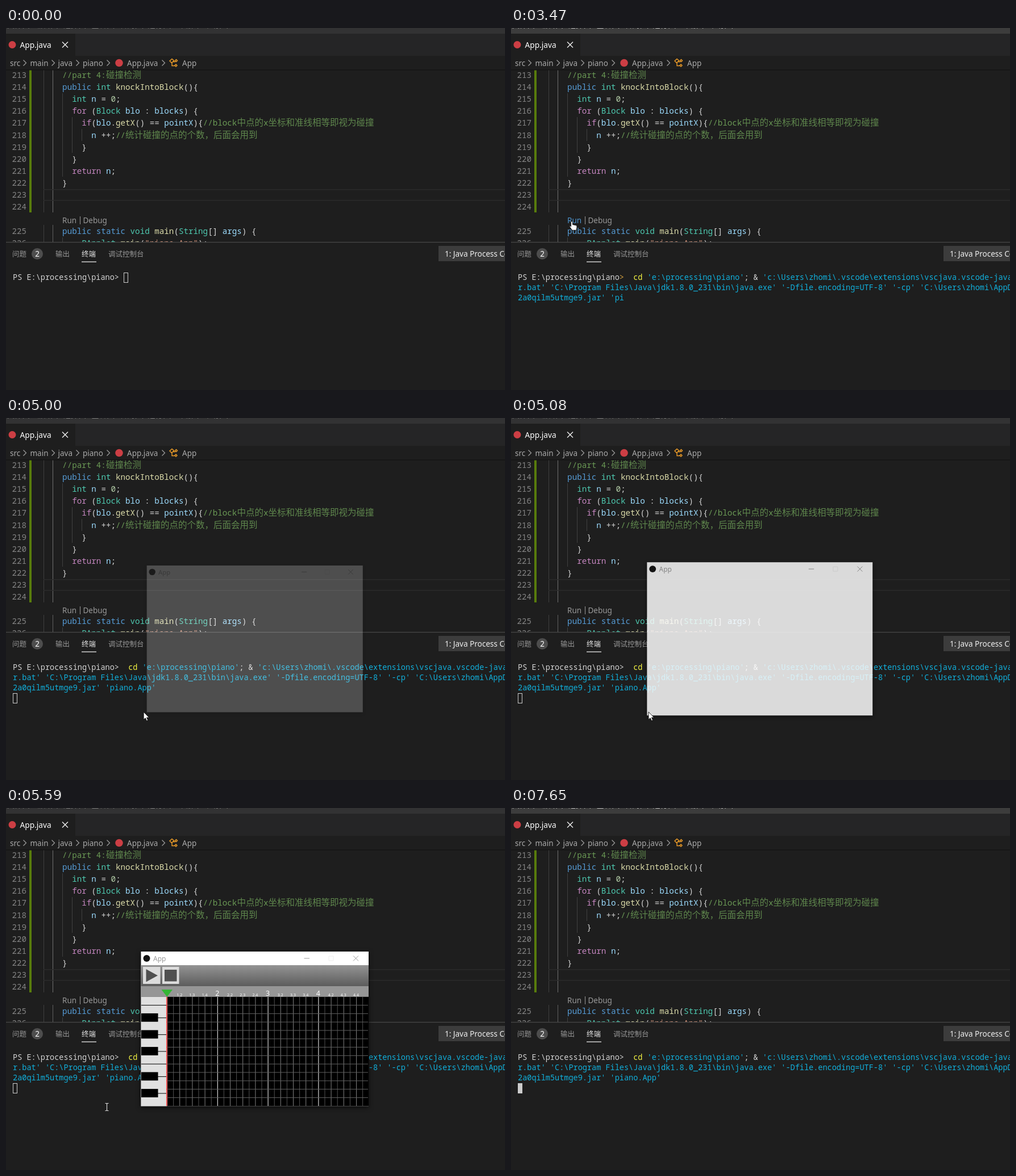
These frames come from a looping animation (878x638 px, 8 s). An HTML page:

```html
<!DOCTYPE html>
<html lang="zh">
<head>
<meta charset="utf-8">
<title>Piano editor</title>
<style>
  html, body { margin: 0; width: 100%; height: 100%; overflow: hidden; background: #1e1e1e; }
  svg { display: block; width: 878px; height: 638px; }
  text { white-space: pre; font-family: "Noto Sans", "Noto Sans CJK SC", sans-serif; font-size: 13.5px; }
  .code { font-family: "Noto Sans Mono", "Noto Sans CJK SC", monospace; font-size: 14.22px; font-weight: 500; }
  .term { font-family: "Noto Sans Mono", monospace; font-size: 13.55px; font-weight: 500; }
  .cjk { font-size: 15.5px; font-weight: 300; fill-opacity: .85; }
  .tab { font-size: 12.5px; }
  .menu { font-size: 13px; }
  .line { fill: none; stroke-width: 1.5; }
  #app { transform-origin: 437.5px 389.5px; filter: drop-shadow(0 2px 4px #000a); }
</style>
</head>
<body>
<svg id="stage" viewBox="0 0 878 638"></svg>
<script>
const LOOP = 8000;
const stage = document.getElementById('stage');
const $ = id => document.getElementById(id);
const esc = s => s.replace(/&/g, '&amp;').replace(/</g, '&lt;');
const rect = (x, y, w, h, fill, more = '') =>
  `<rect x="${x}" y="${y}" width="${w}" height="${h}" fill="${fill}" ${more}/>`;
const text = (x, y, s, fill, cls = '', more = '') =>
  `<text x="${x}" y="${y}" fill="${fill}" class="${cls}" ${more}>${esc(s)}</text>`;
const path = (d, color, more = '') => `<path class="line" d="${d}" stroke="${color}" ${more}/>`;
const shape = (d, fill, more = '') => `<path d="${d}" fill="${fill}" ${more}/>`;
const circle = (x, y, r, fill) => `<circle cx="${x}" cy="${y}" r="${r}" fill="${fill}"/>`;
const range = n => [...Array(n).keys()];

// Editor code: [line number, column, colour key, text, colour key, text, ...]
const COLORS = { b: '#569cd6', t: '#4ec9b0', f: '#dcdcaa', v: '#9cdcfe', w: '#d4d4d4',
                 k: '#c586c0', n: '#b5cea8', c: '#6a9955', s: '#ce9178' };
const CODE = [
  [213, 4, 'c', '//part 4:碰撞检测'],
  [214, 4, 'b', 'public ', 't', 'int ', 'f', 'knockIntoBlock', 'w', '(){'],
  [215, 6, 't', 'int ', 'v', 'n', 'w', ' = ', 'n', '0', 'w', ';'],
  [216, 6, 'k', 'for ', 'w', '(', 't', 'Block ', 'v', 'blo', 'w', ' : ', 'v', 'blocks', 'w', ') {'],
  [217, 8, 'k', 'if', 'w', '(', 'v', 'blo', 'w', '.', 'f', 'getX', 'w', '() == ', 'v', 'pointX', 'w', '){',
    'c', '//block中点的x坐标和准线相等即视为碰撞'],
  [218, 10, 'v', 'n', 'w', ' ++;', 'c', '//统计碰撞的点的个数，后面会用到'],
  [219, 8, 'w', '}'],
  [220, 6, 'w', '}'],
  [221, 6, 'k', 'return ', 'v', 'n', 'w', ';'],
  [222, 4, 'w', '}'],
  [223, 4], [224, 4],
  [225, 4, 'b', 'public static ', 't', 'void ', 'f', 'main', 'w', '(', 't', 'String', 'w', '[] ',
    'v', 'args', 'w', ') {'],
  [226, 8, 't', 'PApplet', 'w', '.', 'f', 'main', 'w', '(', 's', '"piano.App"', 'w', ');'],
];

function codeLine([num, col, ...runs]) {
  const y = Math.round(87.8 + (num - 213 + (num > 224)) * 21.14);
  let spans = '';
  for (let i = 0; i < runs.length; i += 2) {
    for (const part of runs[i + 1].split(/([\u4e00-\u9fff，]+)/)) {
      const wide = /[\u4e00-\u9fff]/.test(part) ? 'cjk' : '';
      spans += `<tspan class="${wide}" fill="${COLORS[runs[i]]}">${esc(part)}</tspan>`;
    }
  }
  return text(36, y, String(num), '#858585', 'code', 'text-anchor="end"') +
    `<text class="code" x="${65 + col * 8.53}" y="${y}">${spans}</text>`;
}

const guide = (x, y1, y2, color = '#404040') => rect(x, y1, 1, y2 - y1, color);
const chevron = x => path(`M${x - 2.5} 56.5l5 5l-5 5`, '#a0a0a0', 'style="stroke-width:1.2"');

function editor() {
  const crumbs = [[7, 'src'], [42.5, 'main'], [91.5, 'java'], [135, 'piano'], [213, 'App.java'], [310, 'App']];
  const menu = ['文件(F)', '编辑(E)', '选择(S)', '查看(V)', '转到(G)', '运行(R)', '终端(T)', '帮助(H)'];
  return rect(0, 0, 878, 638, '#1e1e1e') +
    rect(0, 0, 878, 10, '#323233', 'id="titlebar"') +
    `<g id="menu">${menu.map((m, i) => text(2 + i * 49.5, -1, m, 'currentColor', 'menu')).join('')}</g>` +
    rect(0, 10, 878, 39, '#252526') + rect(0, 10, 122, 39, '#1e1e1e') +
    circle(11, 29.5, 6.5, '#cc3e44') + text(24.5, 35, 'App.java', '#fff', '', 'style="font-size:13.7px"') +
    path('M99 24.5l10 10m0 -10l-10 10', '#e8e8e8') +
    crumbs.map(([x, s]) => text(x, 67, s, '#a9a9a9')).join('') +
    [33, 83, 126, 180, 277].map(chevron).join('') + circle(199, 61.5, 6.8, '#cc3e44') +
    path('M288 58l4 -3.5l3.5 3l-4 4zM294 59.5h4M292 61.5v5h5M297.5 57.5l2 2l2 -2l-2 -2zM297 66l2 2l2 -2l-2 -2z',
      '#ee9d28', 'style="stroke-width:1.4"') +
    `<g clip-path="url(#code)">` +
    rect(41, 74, 4, 251, '#587c0c') +
    guide(66, 74, 325) + guide(82, 74, 325, '#707070') + guide(66, 347, 377) + guide(82, 347, 377, '#606060') +
    guide(99, 115, 262) + guide(116, 157, 220) + guide(133, 178, 199) + guide(99, 369, 377) +
    rect(66, 284, 812, 1.5, '#2b2b2b') + rect(66, 303, 812, 1.5, '#2b2b2b') +
    CODE.map(codeLine).join('') + '</g>' +
    rect(0, 73, 878, 1.5, '#151515') +
    rect(65, 284, 2, 21, '#c8c8c8', 'id="caret"') +
    text(99, 344, 'Run', '#999', '', 'id="run"') + rect(130, 332, 1, 14, '#999') + text(135.5, 344, 'Debug', '#999');
}

function panel() {
  return rect(0, 377, 878, 1.2, '#484848') +
    text(11, 403, '问题', '#969696', 'tab') + circle(55, 398, 10, '#4d4d4d') +
    text(55, 403, '2', '#fff', '', 'text-anchor="middle"') +
    text(87, 403, '输出', '#969696', 'tab') + text(133, 403, '终端', '#e7e7e7', 'tab') +
    rect(133, 411.5, 26, 1.3, '#e7e7e7') + text(180, 403, '调试控制台', '#969696', 'tab') +
    rect(761, 384, 117, 27, '#3c3c3c') + text(772, 403, '1: Java Process Console', '#f0f0f0') +
    '<g id="term"></g>' + rect(0, 0, 7, 17, 'none', 'id="block" stroke="#ccc"');
}

function debugBar() {
  const blue = '#75beff', dim = 'opacity=".5"';
  const dots = range(8).map(i => rect(311 + i % 2 * 5, 21.5 + (i >> 1) * 3.6, 2.4, 2, '#8a8a8a')).join('');
  return '<g id="debug">' +
    rect(299, 10, 274, 35, '#333', 'style="filter:drop-shadow(0 5px 5px #000)"') + dots +
    rect(337.5, 21, 2.2, 13, blue) + rect(344.5, 21, 2.2, 13, blue) +
    `<g ${dim}>` +
    path('M371 27a7.5 7.5 0 0 1 13 -1M384.5 20v6.5h-6', blue) + circle(378, 32, 2.2, blue) +
    path('M413 19v10M408.5 24.5l4.5 4.5l4.5 -4.5', blue) + circle(413, 33.5, 2.2, blue) +
    path('M449 30v-10M444.5 24.5l4.5 -4.5l4.5 4.5', blue) + circle(449, 33.5, 2.2, blue) + '</g>' +
    path('M479 25a6.3 6.3 0 1 1 -.3 5M478 20v5.5h5.5', '#89d185', 'style="stroke-width:1.8"') +
    path('M514 22h12v12h-12z', '#f48771') +
    shape('M553 20h5l-2 5.5h4.5l-8 9.5l1.8 -7h-4.3z', '#f0a030') + '</g>';
}

function appWindow() {
  const row = 14.8, top = 332.8, left = 283, beat = 22.2;
  const verticals = range(32).map(i =>
    rect(left + i * beat / 2, top, 1, 525 - top, i % 8 ? (i % 2 ? '#505050' : '#808080') : '#fff')).join('');
  const horizontals = range(12).map(i => rect(left, top + (i + 1) * row - .5, 354, 1, '#606060')).join('');
  const keys = [2, 4, 6, 9, 11].map(i =>
    rect(238, top + i * row - .5, 29.5, row, '#000') + rect(267, top + (i + .5) * row - .5, 16, 1, '#000')).join('') +
    [1, 8].map(i => rect(238, top + i * row - .5, 45, 1, '#000')).join('');
  const marks = range(15).map(n => n + 1).map(i => {
    const bar = 1 + (i >> 2), sub = i % 4;
    return text(left + i * beat, sub ? 332 : 331, sub ? `${bar}.${sub + 1}` : String(bar), '#fff', '',
      `text-anchor="middle" style="font-size:${sub ? 7 : 12.5}px"`);
  }).join('');
  return '<g id="app">' + rect(237.5, 253, 400.5, 272.5, '#fff') +
    circle(247.5, 265, 6, '#111') + text(259, 270, 'App', '#999', '', 'style="font-size:12px"') +
    path('M524.5 265h9.5', '#999', 'style="stroke-width:1"') +
    path('M568 261h8v8h-8z', '#eee', 'style="stroke-width:1"') +
    path('M611 260.5l9 9m0 -9l-9 9', '#999', 'style="stroke-width:1"') +
    '<g id="content">' + rect(237.5, 277, 400.5, 37, 'url(#bar)') + rect(237.5, 314, 400.5, 19, '#969696') +
    rect(241, 280, 30.5, 30, '#dcdcdc') + shape('M246.5 284l20.5 11.3l-20.5 11.3z', '#505050') +
    rect(275, 280, 29.5, 30, '#dcdcdc') + rect(279, 285, 21.5, 20.5, '#505050') + marks +
    rect(237.5, top, 400.5, 525.5 - top, '#000') + rect(237.5, top, 45.5, 525.5 - top, '#e0e0e0') +
    verticals + horizontals + keys + rect(282, top, 1.6, 525 - top, '#f03030') +
    shape('M273.5 320h19.5l-9.7 12.8z', '#35b535') + '</g></g>';
}

const mouse = '<g id="mouse">' +
  path('M-3 -6.5h2l1 1l1 -1h2M0 -5.5v11M-3 6.5h2l1 -1l1 1h2', '#ddd', 'id="beam" style="stroke-width:1.1"') +
  shape('M0 0v13.5l3.1 -2.8l2.2 4.9l2.2 -1l-2.1 -4.7h4.2z', '#fff', 'id="arrow" stroke="#000" stroke-width=".8"') +
  shape('M-1.4 -.5q1.4 -1.6 2.8 0v5l6 1.3q1.8 .7 1.6 3l-1 5.5h-7.5l-4.5 -6.5q.8 -2 2.6 .2z', '#fff',
    'id="hand" stroke="#111" stroke-width=".8"') + '</g>';

stage.innerHTML = `<defs>
  <clipPath id="code"><rect y="74" width="878" height="303"/></clipPath>
  <linearGradient id="bar" x2="0" y2="1"><stop stop-color="#949494"/><stop offset="1" stop-color="#5c5c5c"/></linearGradient>
  </defs>` + editor() + panel() + debugBar() + appWindow() + mouse;

// Terminal command, split where the console wraps
const CYAN = '#11b0dc', PLAIN = '#d4d4d4', YELLOW = '#f5f543';
const COMMAND = [
  [[PLAIN, '  '], [YELLOW, 'cd '], [CYAN, "'e:\\processing\\piano'"], [PLAIN, '; & '],
    [CYAN, "'c:\\Users\\zhomi\\.vscode\\extensions\\vscjava.vscode-java-debug"]],
  [[CYAN, "r.bat' 'C:\\Program Files\\Java\\jdk1.8.0_231\\bin\\java.exe' '-Dfile.encoding=UTF-8' '-cp' 'C:\\Users\\zhomi\\AppData\\Local"]],
  [[CYAN, "2a0qilm5utmge9.jar' 'piano.App'"]],
];
const TOTAL = COMMAND.flat().reduce((sum, [, s]) => sum + s.length, 0);
let drawn = -1;

function drawTerminal(count) {
  if (count === drawn) return;
  drawn = count;
  const typing = count > 0 && count < TOTAL;
  const span = (fill, s) => `<tspan fill="${fill}">${esc(s)}</tspan>`;
  let rest = count;
  $('term').innerHTML = COMMAND.map((runs, i) => {
    let spans = i ? '' : span(PLAIN, 'PS E:\\processing\\piano') + span(typing ? '#d9a441' : PLAIN, '>');
    for (const [fill, s] of runs) {
      spans += span(fill, s.slice(0, Math.max(0, rest)));
      rest -= s.length;
    }
    return `<text class="term" x="12" y="${444 + i * 18}">${spans}</text>`;
  }).join('');
}

function typed(t) {
  if (t < 3180) return 0;
  if (t >= 3520) return TOTAL;
  return Math.round((TOTAL - 8) * (Math.floor((t - 3170) / 50) + 1) / 7);
}

const between = (t, a, b) => t >= a && t < b;

// Time, x, y of the pointer's hot spot
const TRACK = [
  [140, 377, 612], [480, 190, 415], [690, 101, 345], [820, 107, 342], [3850, 107, 342],
  [4300, 254, 527], [4620, 246, 520], [4670, 244, 519], [5030, 242, 518], [5360, 242, 518],
  [5590, 177.5, 527], [5740, 177.5, 527], [5790, 167.5, 531.5], [5930, 167.5, 531.5],
  [6290, 175, 527], [6540, 174, 527], [6750, 174, 527], [7000, 320, 622], [7200, 392, 618],
  [7550, 379, 585], [7650, 363, 636],
];

function along(track, t) {
  const i = track.findIndex(p => p[0] > t);
  if (i < 1) return track[i < 0 ? track.length - 1 : 0].slice(1);
  const [a, b] = [track[i - 1], track[i]];
  const k = (t - a[0]) / (b[0] - a[0]);
  return a.slice(1).map((v, j) => v + (b[j + 1] - v) * k);
}

// Time, opacity, scale of the opening window
const OPENING = [[4980, 0, .93], [5030, .5, .975], [5080, .835, .991], [5130, .835, .991], [5180, 1, 1]];

const show = (id, on) => { $(id).style.display = on ? '' : 'none'; };

function render(t) {
  const active = between(t, 1120, 4950) || t >= 5930;
  $('titlebar').setAttribute('fill', active ? '#3c3c3c' : '#323233');
  $('menu').style.color = active ? '#ccc' : '#858585';
  show('caret', between(t, 1120, 1620) || between(t, 2130, 2640));
  show('debug', between(t, 1430, 3130));

  drawTerminal(typed(t));
  const block = $('block'), done = t >= 3620;
  show('block', t < 3180 || done);
  block.setAttribute('transform', done ? 'translate(12.5 485.5)' : 'translate(207.5 431.5)');
  block.setAttribute('fill', active && t >= 3130 ? '#ccc' : 'none');

  const open = between(t, 4980, 5790);
  const [opacity, scale] = along(OPENING, t);
  show('app', open);
  show('content', t >= 5360);
  $('app').style.opacity = opacity;
  $('app').style.transform = `scale(${scale})`;

  const [x, y] = along(TRACK, t);
  const onRun = t >= 140 && between(x, 98, 126) && between(y, 330, 348);
  const onWindow = open && between(x, 237, 639) && between(y, 253, 526);
  const arrow = onWindow || between(y, 377, 418);
  show('mouse', between(t, 140, 7650));
  $('mouse').setAttribute('transform', `translate(${x} ${y})`);
  show('hand', onRun);
  show('arrow', arrow);
  show('beam', !onRun && !arrow);
  $('run').setAttribute('fill', onRun ? '#4e94ce' : '#999');
}

const start = performance.now();
function tick() {
  render((performance.now() - start) % LOOP);
  requestAnimationFrame(tick);
}
tick();
</script>
</body>
</html>
```
